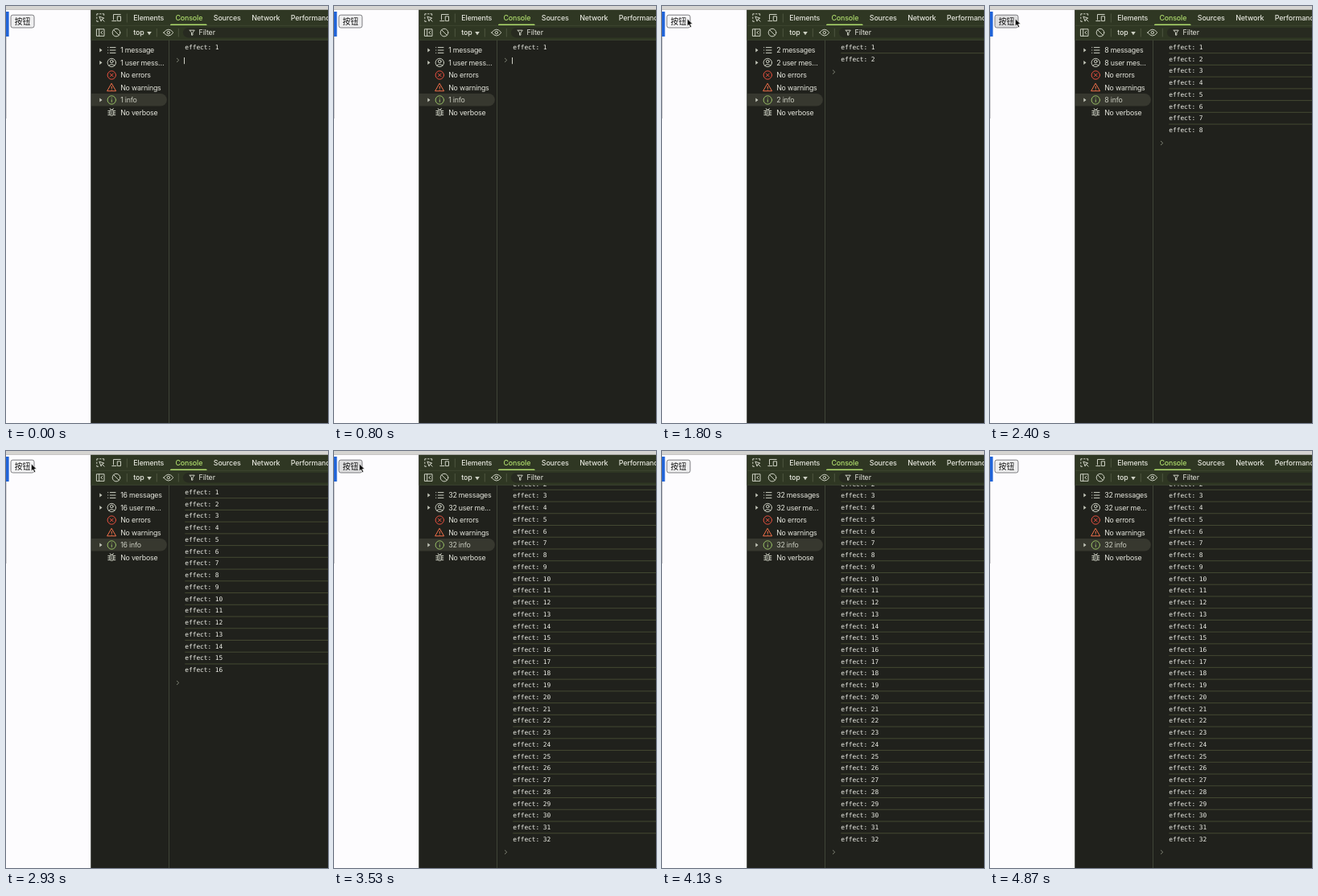
An HTML page that plays this animation: 400x519 px, repeating every 4.94 s.

```html
<!DOCTYPE html>
<html lang="zh">
<head>
<meta charset="utf-8">
<title>effect console</title>
<style>
  html, body { margin: 0; width: 100%; height: 100%; overflow: hidden; background: #20211c; }
  svg { display: block; width: 400px; height: 519px; }
  .ui { font: 500 8.8px Inter, Roboto, sans-serif; letter-spacing: -.09px; fill: #e4e5dc; }
  .side { font-weight: 400; letter-spacing: -.2px; }
  .log { font: 7.8px "DejaVu Sans Mono", monospace; fill: #f0f1ea; white-space: pre; }
  .btn { font: 9.8px "Noto Sans CJK SC", "Noto Sans CJK", sans-serif; fill: #111; }
  .ic { fill: none; stroke: #cdd0c3; stroke-width: 1; stroke-linecap: round; stroke-linejoin: round; }
  .sep { stroke: #565d48; stroke-width: .8; }
</style>
</head>
<body>
<svg viewBox="0 0 400 519" xmlns="http://www.w3.org/2000/svg">
  <defs><clipPath id="pane"><rect x="203" y="42.5" width="197" height="477"/></clipPath></defs>

  <!-- page -->
  <rect width="106" height="519" fill="#fdfcfe"/>
  <rect y="38" width=".6" height="102" fill="#b9b9bd"/>
  <rect y="7" width="3.6" height="31" fill="#2063d8"/>
  <rect id="button" x="6" y="11.2" width="29" height="15.8" rx="2.4" stroke="#6f6f73" stroke-width=".9"/>
  <text class="btn" x="10.8" y="22.8">按钮</text>

  <!-- devtools panels -->
  <rect x="105.5" width="294.5" height="519" fill="#20211c"/>
  <rect x="105.5" y="4" width="294.5" height="38.3" fill="#2f3723"/>
  <path d="M105.5 24.3H400M105.5 42.3H400" stroke="#444c37" stroke-width=".7"/>
  <path d="M202.5 42.5V519" stroke="#454a3c" stroke-width=".9"/>
  <path d="M105.5 5V519" stroke="#3a3d34" stroke-width=".6"/>
  <rect width="400" height="4.6" fill="#d5d4d1"/>
  <rect y="4.3" width="400" height=".6" fill="#b4b3b0"/>

  <!-- tab bar -->
  <g class="ic">
    <path d="M112.8 11.5v-1.7h1.7M112.8 14v1.5M112.8 18v1.3h1.7M116.5 9.8h1.5M120 9.8h1.7v1.7" />
    <path d="M116.2 13.2l5.6 2-2.5 1-1 2.5zM119.5 16.5l2.6 2.7"/>
    <path d="M133.5 17V10.5h8.7M131.8 18.6h5M138.7 12.9h3.8v5.7h-3.8z"/>
  </g>
  <path class="sep" d="M150.3 9.5V20.5M150.3 28V38.5M187.3 28V38.5M214.3 28V38.5"/>
  <g class="ui" id="tabs"></g>
  <path d="M204 24v-.3q0-1.3 1.4-1.3h42.8q1.4 0 1.4 1.3v.3z" fill="#aedb6c"/>

  <!-- toolbar -->
  <g class="ic">
    <path d="M112.8 28.8h9.2v8.6h-9.2zM115.7 28.8v8.6M119.8 31.3l-2 1.8 2 1.8"/>
    <circle cx="137" cy="33.1" r="4.8"/><path d="M133.7 29.8l6.6 6.6"/>
    <path d="M195.8 33.1q6-8 12 0q-6 8-12 0z"/><circle cx="201.8" cy="33.1" r="1.7"/>
  </g>
  <text class="ui" x="158.3" y="36.3">top</text>
  <path d="M175.2 32h5.6l-2.8 4.2z" fill="#cdd0c3"/>
  <rect x="220" y="27" width="200" height="12.4" rx="6.2" fill="#272a20"/>
  <path class="ic" d="M228.2 30.2h6l-2.3 3v3h-1.4v-3z"/>
  <text class="ui" x="239.6" y="36.3" style="font-weight:400">Filter</text>

  <!-- sidebar -->
  <path d="M106 109h86a7.8 7.8 0 0 1 0 15.6H106z" fill="#37382f"/>
  <path d="M116.3 52.4l3.2 2.6-3.2 2.6zM116.3 67.9l3.2 2.6-3.2 2.6zM116.3 114.4l3.2 2.6-3.2 2.6z" fill="#c5c8bc"/>
  <g class="ic">
    <path d="M126.6 51.6h.2M126.6 55h.2M126.6 58.4h.2M129.3 51.6h6.7M129.3 55h6.7M129.3 58.4h6.7"/>
    <circle cx="131.3" cy="70.5" r="5.2"/><circle cx="131.3" cy="69" r="1.8"/><path d="M127.7 74.1q3.6-3 7.2 0"/>
    <g stroke="#e8503f"><circle cx="131.3" cy="86" r="5.2"/><path d="M129.3 84l4 4M133.3 84l-4 4"/></g>
    <g stroke="#f0704a"><path d="M131.3 96.6l5.3 9.2h-10.6z"/><path d="M131.3 100.2v2.4M131.3 104.2v.1"/></g>
    <g stroke="#98bf65"><circle cx="131.3" cy="117" r="5.2"/><path d="M131.3 116.6v2.8M131.3 114.4v.1"/></g>
    <rect x="128.9" y="129.3" width="4.8" height="7.2" rx="2.3"/>
    <path d="M129.3 127.6l1 1.5M133.3 127.6l-1 1.5M126.8 130.4h2M126.8 133h2M126.8 135.6h2M133.8 130.4h2M133.8 133h2M133.8 135.6h2M130.5 131.9h1.6M130.5 134.2h1.6"/>
  </g>
  <g class="ui side" id="side"></g>

  <!-- console -->
  <g clip-path="url(#pane)"><g id="list">
    <g id="prompt">
      <path d="M-10.3 -2.5l2.8 2.5-2.8 2.5" fill="none" stroke="#858a7b" stroke-width=".9"/>
      <rect id="caret" x="-1.2" y="-3.4" width=".9" height="8.2" fill="#e4e5dc"/>
    </g>
  </g></g>

  <path id="cursor" d="M0 0V9.4L2.2 7.4 3.8 11 5.5 10.2 3.9 6.8H6.9Z" fill="#080808" stroke="#fff" stroke-width=".75" stroke-linejoin="round"/>
</svg>
<script>
const LOOP = 4940, TICK = 1000 / 15;
const LEFT = 222.3, TOP = 51.2, PITCH = 14.74;
const el = id => document.getElementById(id);

function add(parent, tag, attrs, text = '') {
  const node = document.createElementNS('http://www.w3.org/2000/svg', tag);
  for (const k in attrs) node.setAttribute(k, attrs[k]);
  node.textContent = text;
  parent.append(node);
  return node;
}

[['Elements', 158.3], ['Console', 210.4], ['Sources', 257.8], ['Network', 305.2], ['Performance', 353.8]]
  .forEach(([name, x], i) => {
    const tab = add(el('tabs'), 'text', { x, y: 18.2 }, name);
    if (i === 1) tab.style.fill = '#aedb6c';
  });

const labels = Array.from({ length: 6 }, (_, i) =>
  add(el('side'), 'text', { x: 142.2, y: 58.2 + i * 15.48 }));
labels[4].style.fill = '#c9cbbf';

const rows = Array.from({ length: 32 }, (_, i) => {
  const row = add(el('list'), 'g', { transform: `translate(${LEFT} ${TOP + i * PITCH})` });
  if (i) add(row, 'path', { d: 'M0 -7.3H180', stroke: '#4d5438', 'stroke-width': .8 });
  add(row, 'text', { class: 'log', y: 2.8 }, `effect: ${i + 1}`);
  return row;
});

// every click doubles the number of messages
const clicks = [1470, 1870, 2270, 2670, 3070];
const PRESS = 145;

// time, x, y of the pointer tip
const path = [
  [800, 408, 14], [870, 385, 28], [930, 310, 48], [1000, 205, 52], [1070, 115, 40],
  [1130, 58, 24], [1200, 34, 17], [1270, 31.3, 15.8], [3600, 31.3, 15.8], [3670, 40, 18],
  [3730, 108, 32], [3800, 215, 38], [3870, 312, 33], [3930, 374.6, 25.8], [4000, 402, 16]
];

function pointAt(t) {
  const i = path.findIndex(p => p[0] > t);
  if (i < 1) return null;
  const [a, b] = [path[i - 1], path[i]];
  const f = (t - a[0]) / (b[0] - a[0]);
  return [a[1] + (b[1] - a[1]) * f, a[2] + (b[2] - a[2]) * f];
}

function setLabels(n) {
  const user = n === 1 ? 'mess…' : n < 10 ? 'mes…' : 'me…';
  [`${n} message${n > 1 ? 's' : ''}`, `${n} user ${user}`, 'No errors', 'No warnings', `${n} info`, 'No verbose']
    .forEach((s, i) => labels[i].textContent = s);
}

let shown = 0;
function setCount(n) {
  if (n === shown) return;
  shown = n;
  setLabels(n);
  rows.forEach((row, i) => row.style.display = i < n ? '' : 'none');
  el('prompt').setAttribute('transform', `translate(${LEFT} ${TOP + (n - 1) * PITCH + 16.2})`);
  el('list').setAttribute('transform', `translate(0 ${n === 32 ? -25.1 : 0})`);
}

function draw(time) {
  const k = Math.floor((time % LOOP + 3.4) / TICK);
  const t = Math.round(k * TICK / 10) * 10;

  setCount(2 ** clicks.filter(c => c <= t).length);

  const pressed = clicks.some(c => t >= c - PRESS && t < c);
  const hover = t >= 1330 && t < 3730;
  el('button').setAttribute('fill', pressed ? '#f5f5f6' : hover ? '#dededf' : '#efeff0');

  el('caret').style.display = t < 130 || (t >= 530 && t < 930) ? '' : 'none';

  const p = pointAt(t);
  el('cursor').style.display = p ? '' : 'none';
  if (p) el('cursor').setAttribute('transform', `translate(${p[0]} ${p[1]})`);
}

const start = performance.now();
function loop() {
  draw(performance.now() - start);
  requestAnimationFrame(loop);
}
loop();
</script>
</body>
</html>
```
